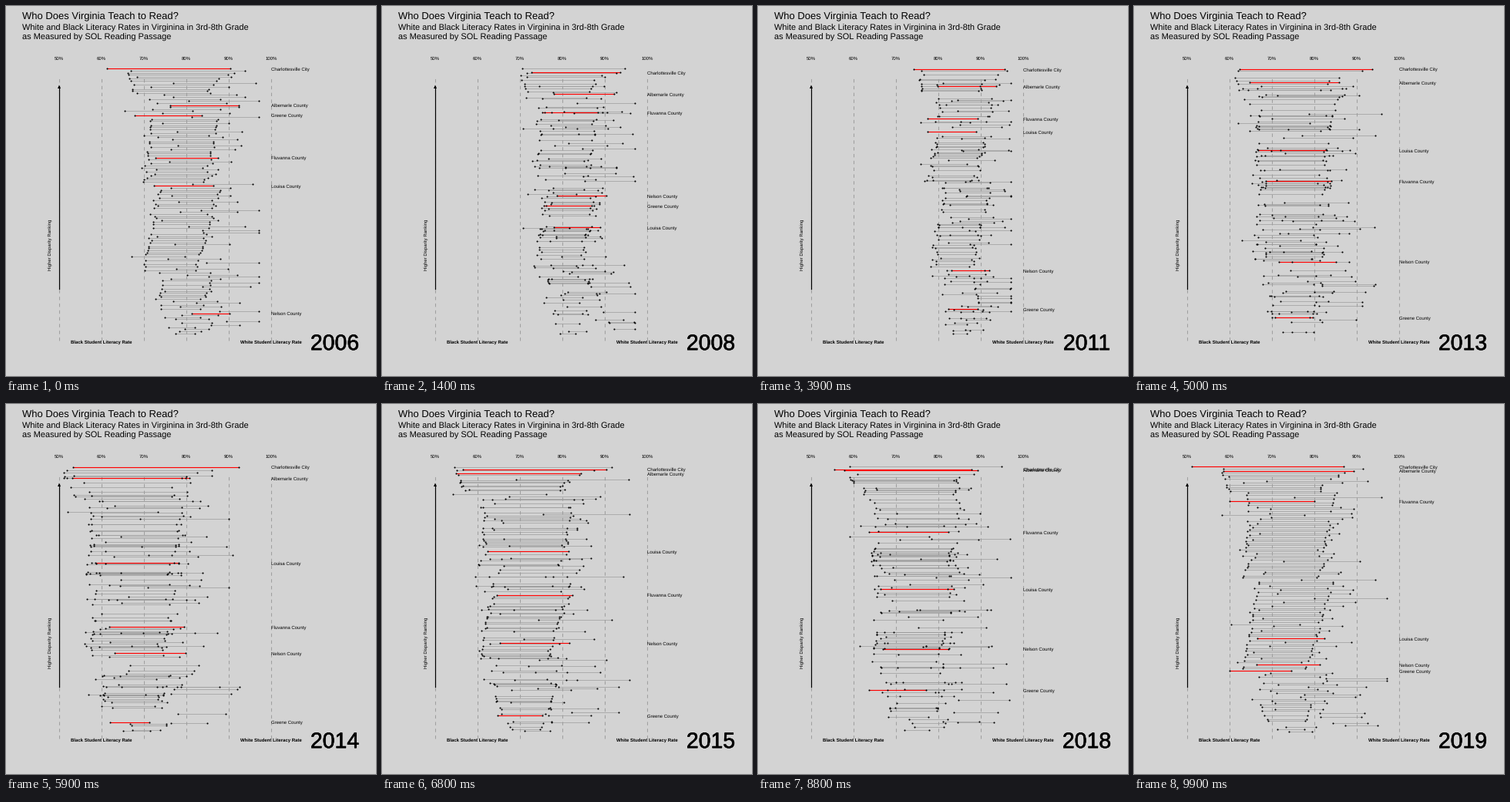
Animation of 480x480 px, one loop 10000 ms. Source, as a matplotlib script:

```python
import numpy as np
import matplotlib.pyplot as plt
from matplotlib import patheffects
from matplotlib.animation import FuncAnimation
from matplotlib.collections import LineCollection

SIZE, DPI, FRAMES = 480, 100, 100
PX = 72 / DPI                      # one pixel in points
TOP, STEP, ROWS = 81.3, 2.62, 132
YEARS = np.arange(2006, 2020)

plt.rcParams["font.family"] = ["Liberation Sans", "DejaVu Sans"]
plt.rcParams["text.hinting"] = "none"
plt.rcParams["text.hinting_factor"] = 1

# Key times; the level is held up to 2012, then drops within one year.
TIMES = [2006, 2007.84, 2009.15, 2011.12, 2012, 2013, 2013.75, 2016.11, 2019]
HOLD = [0, 1, 2, 3, 3, 4, 4, 5, 6]
LEVEL = [72, 75, 79.5, 80, 57.5, 66.5, 65]         # typical lower edge of the black rate
SPREAD = [16.7, 13.8, 12, 12.5, 22.5, 20.5, 20.5]  # typical gap between the rates

# Highlighted places: height in the ranking and black rate.
PLACES = {
    "Charlottesville City": ([81.3, 86, 82.7, 82, 81.5, 88, 81.3], [61.2, 72.7, 77.7, 74.2, 53.3, 59.8, 51]),
    "Albemarle County": ([128.5, 114.3, 163, 104, 96, 84.5, 86.5], [76.2, 78, 83.6, 79.8, 53, 57, 58.5]),
    "Greene County": ([141.5, 259.5, 234, 393, 412.5, 396, 346.3], [67.8, 75.6, 75.2, 82.3, 62, 67.4, 60]),
    "Fluvanna County": ([196.5, 138, 171.8, 146.3, 289, 206, 126], [72.8, 75.3, 80.8, 77.5, 61.8, 67.3, 60]),
    "Louisa County": ([233.3, 287, 194.5, 163, 206, 176, 304], [72.3, 78, 81.5, 77.5, 58.5, 66.3, 66.5]),
    "Nelson County": ([398.5, 246, 192, 343, 323, 297, 338], [81.3, 78.8, 79.5, 83, 63, 67.6, 66.3]),
}


def x_of(rate):
    return 69 + (rate - 50) * 5.5


def at(t, values):
    return np.interp(t, TIMES, np.take(values, HOLD))


def gap(row, t):
    """Gap by rank: steep at the top, nearly straight, then a quick fall."""
    u = row / (ROWS - 1)
    return at(t, SPREAD) * (1 - 0.35 * u + 0.75 * np.exp(-row / 5) - 0.38 * u ** 12)


def low(row, t):
    """Lower edge of the black rate; places with like gaps sort downwards in runs."""
    u = row / (ROWS - 1)
    run = (row + 31) % 44 / 44 - 0.5
    return at(t, LEVEL) - 4 * run + 0.35 * at(t, SPREAD) * (u ** 12 - np.exp(-row / 15))


def highlighted(t):
    y, black = np.array([[at(t, v) for v in place] for place in PLACES.values()]).T
    return np.column_stack([y, black, black + gap((y - TOP) / STEP, t)])


rng = np.random.default_rng(14)
COUNT = ROWS - len(PLACES)
standing = rng.normal(size=COUNT)
lift = rng.exponential(5.5, COUNT) * rng.choice([0, 1, -0.4], COUNT, p=[0.45, 0.45, 0.1])


def make_year(year):
    """Rank the plain counties and give each (y, black rate, white rate)."""
    taken = np.round((highlighted(year)[:, 0] - TOP) / STEP).astype(int)
    free = np.setdiff1d(np.arange(ROWS), taken)
    order = np.argsort(np.argsort(standing + 0.45 * rng.normal(size=COUNT)))
    row = free[np.minimum(order, len(free) - 1)]
    width = gap(row, year)
    bump = np.minimum(lift * rng.uniform(0.6, 1.2, COUNT), 17)
    black = low(row, year) + bump + rng.normal(0, 0.25, COUNT)
    black = np.minimum(black, 97 - width)
    return np.column_stack([TOP + STEP * row, black, black + width])


plain = np.array([make_year(y) for y in YEARS])

fig = plt.figure(figsize=(SIZE / DPI, SIZE / DPI), dpi=DPI, facecolor="#d3d3d3")
ax = fig.add_axes([0, 0, 1, 1])
ax.set(xlim=(0, SIZE), ylim=(SIZE, 0))
ax.axis("off")


def label(x, y, text, px=5.69, **kw):
    kw = {"ha": "center", "va": "center_baseline", **kw}
    return ax.text(x, y, text, fontsize=px * PX, color="black", **kw)


left = dict(ha="left", va="baseline")
label(21, 17, "Who Does Virginia Teach to Read?", 13.2, **left)
label(21, 32, "White and Black Literacy Rates in Virginina in 3rd-8th Grade", 11, **left)
label(21, 43.3, "as Measured by SOL Reading Passage", 11, **left)

for rate in range(50, 101, 10):
    x = x_of(rate)
    ax.plot([x, x], [434, 94], color="#a0a0a0", lw=1.05 * PX, dashes=(4.2, 4.2), zorder=1)
    label(x, 68, f"{rate}%")
ax.plot([69, 69], [367, 104], color="black", lw=1.2 * PX, zorder=2)
ax.fill([69, 67, 71], [102.5, 107, 107], color="black", lw=0, zorder=2)
label(57, 310, "Higher Disparity Ranking", rotation=90, va="center")
label(x_of(60), 435.8, "Black Student Literacy Rate", weight="bold")
label(x_of(100), 435.8, "White Student Literacy Rate", weight="bold")

grey_lines = ax.add_collection(LineCollection([], colors="#9c9c9c", linewidths=0.7 * PX, zorder=3))
red_lines = ax.add_collection(LineCollection([], colors="#ff0000", linewidths=1.15 * PX, zorder=4))
dots, = ax.plot([], [], "o", color="black", ms=2.1 * PX, mew=0, zorder=5)
names = [label(344, 0, name, ha="left") for name in PLACES]
year_text = label(426, 436, "", 28.45)
year_text.set_path_effects([patheffects.withStroke(linewidth=0.6 * PX, foreground="black")])


def segments(data):
    y, x0, x1 = data[:, 0], x_of(data[:, 1]), x_of(data[:, 2])
    return np.stack([np.column_stack([x0, y]), np.column_stack([x1, y])], axis=1)


def draw(i):
    t = 2006 + 13 * i / (FRAMES - 1)
    k = min(int(t - 2006), len(YEARS) - 2)
    f = t - 2006 - k
    others = segments((1 - f) * plain[k] + f * plain[k + 1])
    marked = highlighted(t)
    reds = segments(marked)
    grey_lines.set_segments(others)
    red_lines.set_segments(reds)
    dots.set_data(*np.concatenate([others, reds]).reshape(-1, 2).T)
    for text, y in zip(names, marked[:, 0]):
        text.set_y(y + 0.3)
    year_text.set_text(str(round(t)))
    return [grey_lines, red_lines, dots, year_text, *names]


anim = FuncAnimation(fig, draw, frames=FRAMES, interval=100, repeat=True, repeat_delay=0)
plt.show()
```
